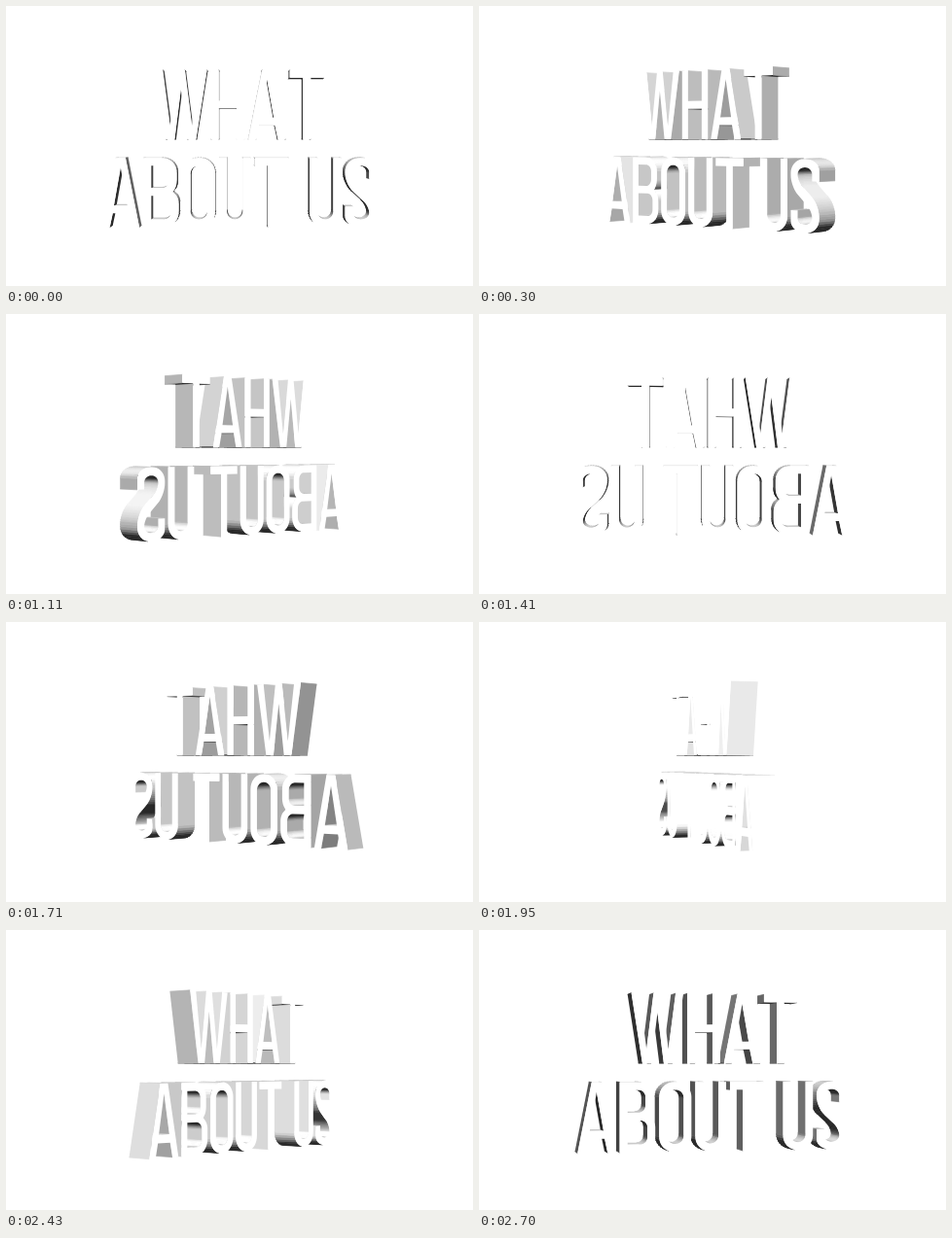
An HTML page with a canvas for the animation above (2730 ms loop, 480x288 px).

```html
<!DOCTYPE html>
<html lang="en">
<head>
<meta charset="utf-8">
<title>What about us</title>
<style>
html, body { margin: 0; width: 100%; height: 100%; overflow: hidden; background: #fff; }
canvas { display: block; }
</style>
</head>
<body>
<canvas id="stage" width="480" height="288"></canvas>
<script>
const ctx = document.getElementById('stage').getContext('2d');
const LOOP = 2730, STEP = 30;
const CENTER_X = 240, HORIZON = 138;
const CAMERA = 1200, LIGHT = 900, SKY_LIGHT = 0.6;
const HALF_DEPTH = 14;
const CAP = 70.5, STROKE = 8, ROUND = 15, GAP = 4;

// Corners are [x, y, radius]; outlines run clockwise, holes the other way.
const box = (x0, y0, x1, y1, left, right) =>
  [[x0, y0, left], [x1, y0, right], [x1, y1, right], [x0, y1, left]];
const hole = (...sides) => box(...sides).reverse();
const mirrored = (w, half) => [...half, ...half.map(([x, y, r]) => [w - x, y, r]).reverse()];
const halfTurned = (w, half) => [...half, ...half.map(([x, y, r]) => [w - x, CAP - y, r])];

const GLYPHS = {
  ' ': { width: 13, build: () => [] },
  W: { width: 53, build: w => [mirrored(w, [
    [(w + STROKE) / 2, 0], [w * 0.71, CAP * 0.8], [w - STROKE, 0], [w, 0],
    [w * 0.79, CAP], [w * 0.62, CAP], [w / 2, CAP * 0.28]])] },
  H: { width: 34, build: w => {
    const inner = w - STROKE, top = (CAP - STROKE) / 2;
    return [mirrored(w, [[inner, top], [inner, 0], [w, 0], [w, CAP], [inner, CAP], [inner, top + STROKE]])];
  } },
  A: { width: 38, build: w => {
    const bar = CAP * 0.8, base = bar - STROKE;
    return [
      mirrored(w, [[w / 2 + 5, 0], [w, CAP], [w - STROKE, CAP], [w * 0.71, bar]]),
      [[w * 0.32, base], [w * 0.68, base], [w / 2, CAP * 0.14]]
    ];
  } },
  T: { width: 35, build: w => {
    const stem = (w + STROKE) / 2;
    return [mirrored(w, [[w, 0], [w, STROKE], [stem, STROKE], [stem, CAP]])];
  } },
  B: { width: 36, build: w => {
    const waist = CAP * 0.49, half = STROKE / 2, inner = w - STROKE;
    return [
      [[0, 0], [w - 2, 0, ROUND], [w - 2, waist - 6, 5], [w - 6, waist],
       [w, waist + 6, 5], [w, CAP, ROUND], [0, CAP]],
      hole(STROKE, STROKE, inner - 2, waist - half, 0, 7),
      hole(STROKE, waist + half, inner, CAP - STROKE, 0, 7)
    ];
  } },
  O: { width: 33, build: w => [
    box(0, 0, w, CAP, ROUND, ROUND),
    hole(STROKE, STROKE, w - STROKE, CAP - STROKE, STROKE, STROKE)] },
  U: { width: 32, build: w => [mirrored(w, [
    [w - STROKE, CAP - STROKE, STROKE], [w - STROKE, 0], [w, 0], [w, CAP, ROUND]])] },
  S: { width: 32.5, build: w => {
    const tip = CAP * 0.3, inner = w - STROKE;
    return [halfTurned(w, [
      [w, tip], [inner, tip], [inner, STROKE, STROKE], [STROKE, STROKE, STROKE],
      [STROKE, tip, STROKE], [w, CAP * 0.62, 11], [w, CAP, ROUND], [0, CAP, ROUND]])];
  } }
};

function roundCorners(corners) {
  const points = [];
  corners.forEach(([x, y, r = 0], i) => {
    if (!r) return points.push([x, y]);
    const reach = ([nx, ny]) => {
      const len = Math.hypot(nx - x, ny - y);
      const k = Math.min(r, len / 2) / len;
      return [(nx - x) * k, (ny - y) * k];
    };
    const a = reach(corners.at(i - 1));
    const b = reach(corners[(i + 1) % corners.length]);
    for (let n = 0; n <= 9; n++) {
      const u = n / 9 * Math.PI / 2;
      const p = 1 - Math.sin(u), q = 1 - Math.cos(u);
      points.push([x + a[0] * p + b[0] * q, y + a[1] * p + b[1] * q]);
    }
  });
  return points;
}

function setLine(text, top) {
  const glyphs = [...text].map(char => GLYPHS[char]);
  let left = -(glyphs.reduce((sum, g) => sum + g.width + GAP, -GAP)) / 2;
  return glyphs.map(({ width, build }) => {
    const x0 = left;
    left += width + GAP;
    const contours = build(width).map(corners =>
      roundCorners(corners).map(([x, y]) => [x + x0, y + top]));
    return { x: x0 + width / 2, contours };
  });
}

const letters = [...setLine('WHAT', -71.5), ...setLine('ABOUT US', 18)];

// A steady turn that falls a few degrees behind during the first half.
function turnAt(t) {
  const u = Math.min(1, t / 1300);
  const lag = 8 * u * u * (3 - 2 * u);
  return (360 * t / LOOP - lag) * Math.PI / 180;
}

function trace(points) {
  points.forEach(([x, y], i) => i ? ctx.lineTo(x, y) : ctx.moveTo(x, y));
  ctx.closePath();
}

function draw(t) {
  const angle = turnAt(t), c = Math.cos(angle), s = Math.sin(angle);
  const rotate = (x, y, z) => [x * c - z * s, y, x * s + z * c];
  const project = (x, y, z) => {
    const p = rotate(x, y, z), k = CAMERA / (CAMERA - p[2]);
    return [CENTER_X + p[0] * k, HORIZON + p[1] * k];
  };

  function visibleWalls(letter) {
    const walls = [];
    for (const contour of letter.contours) {
      contour.forEach(([x0, y0], i) => {
        const [x1, y1] = contour[(i + 1) % contour.length];
        const len = Math.hypot(x1 - x0, y1 - y0);
        if (len < 1e-6) return;
        const nx = (y1 - y0) / len, ny = (x0 - x1) / len;
        const [mx, my, mz] = rotate((x0 + x1) / 2, (y0 + y1) / 2, 0);
        const facing = eye => -nx * c * mx - ny * my + nx * s * (eye - mz);
        if (facing(CAMERA) <= 0) return;
        const lit = facing(LIGHT) / Math.hypot(mx, my, LIGHT - mz) - SKY_LIGHT * ny;
        walls.push({
          far: Math.hypot(mx, my, CAMERA - mz),
          grey: Math.min(255, Math.round(40 + 235 * Math.max(0, lit))),
          quad: [project(x0, y0, HALF_DEPTH), project(x1, y1, HALF_DEPTH),
                 project(x1, y1, -HALF_DEPTH), project(x0, y0, -HALF_DEPTH)]
        });
      });
    }
    return walls.sort((a, b) => b.far - a.far);
  }

  function drawWall({ grey, quad }) {
    ctx.fillStyle = ctx.strokeStyle = `rgb(${grey},${grey},${grey})`;
    ctx.beginPath();
    trace(quad);
    ctx.fill();
    // Close the hairline seams between neighbouring walls.
    ctx.beginPath();
    ctx.moveTo(...quad[1]);
    ctx.lineTo(...quad[2]);
    ctx.moveTo(...quad[0]);
    ctx.lineTo(...quad[3]);
    ctx.stroke();
  }

  ctx.fillStyle = '#fff';
  ctx.fillRect(0, 0, 480, 288);
  ctx.lineWidth = 0.7;
  const ordered = [...letters].sort((a, b) => (a.x - b.x) * s);
  for (const letter of ordered) {
    visibleWalls(letter).forEach(drawWall);
    if (Math.abs(c) * CAMERA <= HALF_DEPTH) continue;
    const z = Math.sign(c) * HALF_DEPTH;
    ctx.fillStyle = '#fff';
    ctx.beginPath();
    for (const contour of letter.contours) trace(contour.map(([x, y]) => project(x, y, z)));
    ctx.fill('evenodd');
  }
}

const start = performance.now();
function tick() {
  const t = (performance.now() - start) % LOOP;
  draw(Math.floor((t + 0.5) / STEP) * STEP % LOOP);
  requestAnimationFrame(tick);
}
tick();
</script>
</body>
</html>
```
